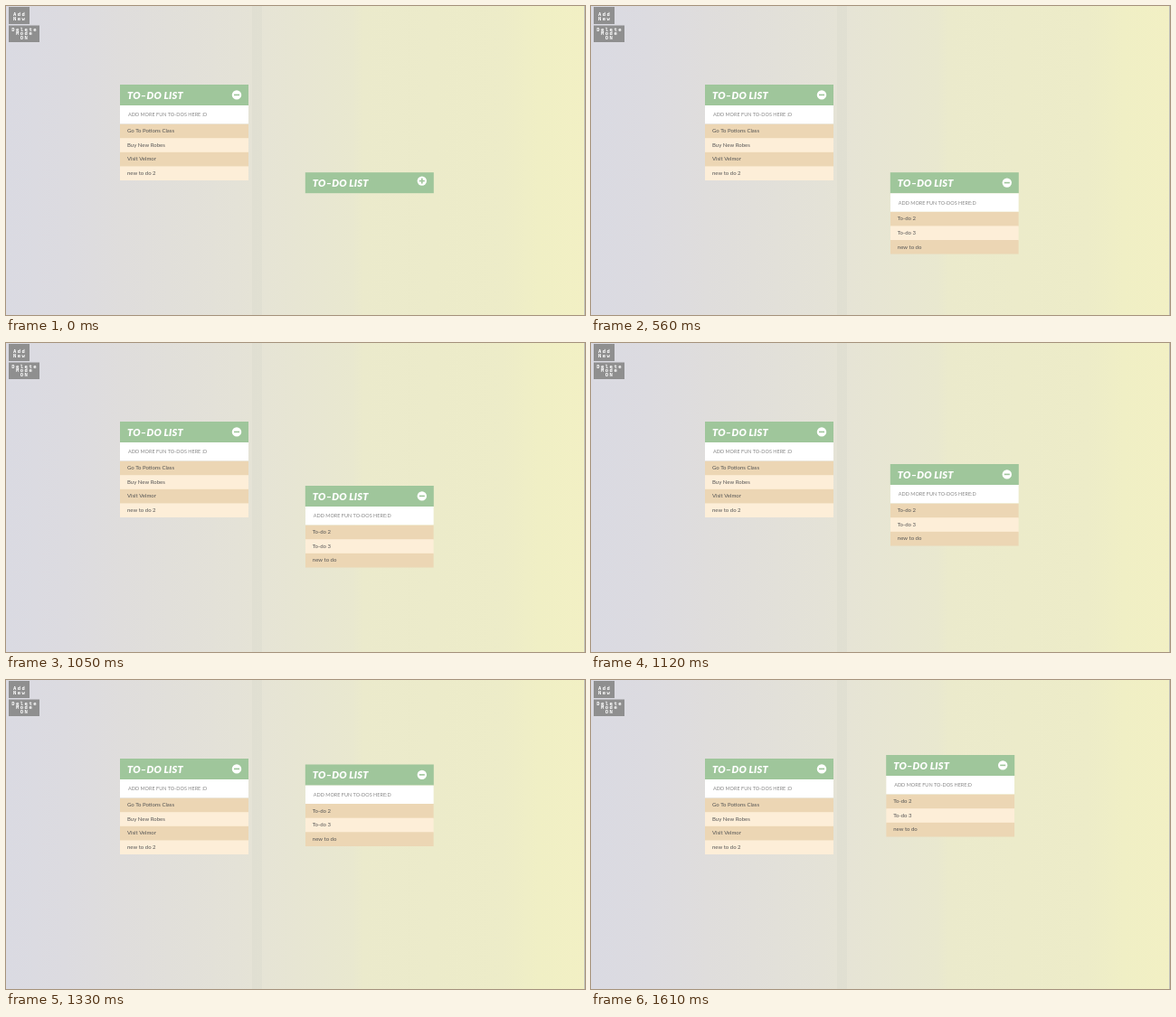
Write an HTML page with a canvas that moves like this. It is 640 by 342 pixels and loops after 1960 ms.

```html
<!DOCTYPE html>
<html lang="en">
<head>
<meta charset="utf-8">
<title>To-do lists</title>
<style>
  html, body { margin: 0; width: 100%; height: 100%; overflow: hidden; }
  canvas { display: block; }
</style>
</head>
<body>
<canvas id="stage" width="640" height="342"></canvas>
<script>
const ctx = document.getElementById('stage').getContext('2d');
const LOOP = 1960, STEP = 70;
const GREEN = '#9fc69b', ROWS = ['#ecd6b4', '#fdeed8'];
const HEAD = 23, INPUT = 20.6, ROW = 15.6, WIDTH = 142;

// Drag path of the second card: time, x, y
const PATH = [
  [980, 330.8, 184.2], [1050, 330.8, 158], [1190, 330.8, 110], [1260, 330.8, 100],
  [1330, 330.8, 93.5], [1400, 330.8, 90], [1470, 329, 86], [1540, 327, 83], [1610, 326.2, 83]
];

const sky = ctx.createLinearGradient(0, 0, 640, 0);
[[0, '#dadae2'], [0.1, '#dcdbe0'], [0.2, '#dfdddc'], [0.4, '#e4e2d7'], [0.45, '#e6e4d5'],
 [0.6, '#e9e8cf'], [0.615, '#ebeacc'], [0.86, '#edecc8'], [0.92, '#f0efc5'], [1, '#f2f0c4']]
  .forEach(([at, color]) => sky.addColorStop(at, color));

function rect(x, y, w, h, color) {
  ctx.fillStyle = color;
  ctx.fillRect(x, y, w, h);
}

function text(str, x, y, font, color, spacing = 0, align = 'left') {
  ctx.font = font;
  ctx.letterSpacing = spacing + 'px';
  ctx.textAlign = align;
  ctx.fillStyle = color;
  ctx.fillText(str, x, y);
}

function clipped(x, y, w, h, draw) {
  ctx.save();
  ctx.beginPath();
  ctx.rect(x, y, w, h);
  ctx.clip();
  draw();
  ctx.restore();
}

function button(y, w, h, baseline, lines) {
  rect(3, y, w, h, '#8f8f8f');
  lines.forEach((line, i) => text(line, 3.6 + w / 2, baseline + i * 4.7,
    'bold 5.5px "DejaVu Sans Mono", monospace', '#fff', 1.5, 'center'));
}

// The icon turns half a circle around a point just above its centre
function icon(x, y, open) {
  ctx.save();
  ctx.translate(x, y);
  ctx.rotate(Math.PI * (1 - open));
  ctx.beginPath();
  ctx.arc(0, 1, 5.2, 0, 7);
  ctx.fillStyle = '#fff';
  ctx.fill();
  rect(-3, 0.2, 6, 1.6, GREEN);
  if (!open) rect(-0.8, -2, 1.6, 6, GREEN);
  ctx.restore();
}

function card(x, y, prompt, items, open = 1) {
  const top = y + HEAD;
  const inputH = INPUT * open;
  const listTop = top + inputH;
  rect(x, y, WIDTH, HEAD, GREEN);
  text('TO–DO LIST', x + 8, y + 15.6, 'italic 900 11px Lato, sans-serif', '#fff', 0.2);
  icon(x + 129, y + 10.4, open);

  clipped(x, top, WIDTH, inputH, () => {
    rect(x, top, WIDTH, inputH, '#fff');
    text(prompt, x + 9, top + inputH / 2 + 2, '5.5px Lato, sans-serif', '#888');
  });
  clipped(x, listTop, WIDTH, items.length * ROW * open, () => items.forEach((item, i) => {
    const rowY = listTop + i * ROW;
    rect(x, rowY, WIDTH, ROW + 1, ROWS[i % 2]);
    text(item, x + 8, rowY + 9.6, '6px Lato, sans-serif', '#555');
  }));
}

function position(t) {
  const next = PATH.findIndex(p => p[0] > t);
  if (next === 0) return PATH[0].slice(1);
  if (next < 0) return PATH[PATH.length - 1].slice(1);
  const a = PATH[next - 1], b = PATH[next];
  const k = (t - a[0]) / (b[0] - a[0]);
  return [1, 2].map(i => a[i] + (b[i] - a[i]) * k);
}

function swing(t, start, duration) {
  const k = Math.min(1, Math.max(0, (t - start) / duration));
  return 0.5 - Math.cos(Math.PI * k) / 2;
}

function draw(now) {
  const t = Math.floor(now % LOOP / STEP) * STEP;
  rect(0, 0, 640, 342, sky);
  rect(272, 0, 11, 342, 'rgba(205,205,195,.2)');
  rect(639, 0, 1, 342, '#c0c0b8');
  button(1, 23, 19, 10.8, ['Add', 'New']);
  button(21.5, 34, 18.5, 27.6, ['Delete', 'Mode', 'ON']);
  card(126, 87, 'ADD MORE FUN TO-DOS HERE :D',
    ['Go To Potions Class', 'Buy New Robes', 'Visit Velmor', 'new to do 2']);
  card(...position(t), 'ADD MORE FUN TO-DOS HERE:D',
    ['To-do 2', 'To-do 3', 'new to do'], swing(t, 80, 430));
}

const start = performance.now();
function tick() {
  draw(performance.now() - start);
  requestAnimationFrame(tick);
}
tick();
</script>
</body>
</html>
```
